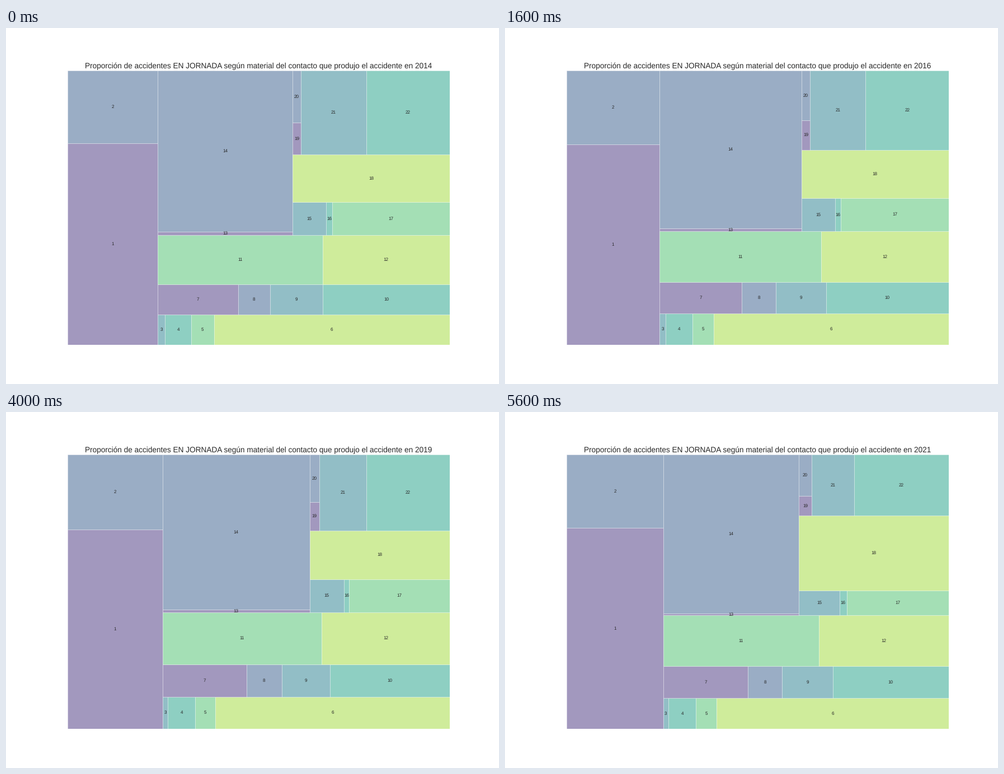
A matplotlib script that plays this animation: 881 px wide and 636 px high, repeating every 6400 ms.

```python
import matplotlib
import matplotlib.pyplot as plt
import numpy as np
from matplotlib.animation import FuncAnimation
from matplotlib.patches import Rectangle

W, H, DPI = 881, 636, 64
PT = 72 / DPI  # points per pixel
FIRST_YEAR, YEARS = 2014, 8
INK = "#262626"

plt.rcParams["font.family"] = "Liberation Sans"
plt.rcParams["text.hinting"] = "none"

# Accidents per 10,000 for each material, in three key years.
SHARES = {
    2014: [1734, 625, 21, 76, 65, 680, 232, 92, 153, 366, 775,
           598, 43, 2072, 106, 20, 370, 714, 26, 42, 524, 667],
    2019: [1804, 677, 17, 84, 62, 720, 257, 108, 148, 366, 799,
           641, 33, 2183, 107, 17, 317, 650, 25, 42, 342, 602],
    2021: [1852, 676, 15, 81, 60, 679, 260, 104, 155, 355, 754,
           630, 24, 2058, 96, 17, 241, 1070, 24, 49, 249, 551],
}


def shares_for(year):
    """Shares as areas of a 100 x 100 square, easing out between key years."""
    a, b = (2014, 2019) if year <= 2019 else (2019, 2021)
    pace = ((year - a) / (b - a)) ** 0.6
    mix = (1 - pace) * np.array(SHARES[a]) + pace * np.array(SHARES[b])
    return list(mix * 1e4 / mix.sum())


def worst_ratio(strip, side):
    depth = sum(strip) / side
    return max(max(s / depth**2, depth**2 / s) for s in strip)


def squarify(sizes):
    """Squarified treemap: boxes (x, y, width, height) in the given order."""
    x, y, dx, dy = 0, 0, 100, 100
    boxes = []
    while sizes:
        side = min(dx, dy)
        n = 1
        while (n < len(sizes) and worst_ratio(sizes[:n], side)
               >= worst_ratio(sizes[:n + 1], side)):
            n += 1
        strip, sizes = sizes[:n], sizes[n:]
        depth = sum(strip) / side
        offset = 0
        for size in strip:
            length = size / depth
            if dx >= dy:
                boxes.append((x, y + offset, depth, length))
            else:
                boxes.append((x + offset, y, length, depth))
            offset += length
        if dx >= dy:
            x, dx = x + depth, dx - depth
        else:
            y, dy = y + depth, dy - depth
    return boxes


fig = plt.figure(figsize=(W / DPI, H / DPI), dpi=DPI, facecolor="white")
ax = fig.add_axes([0.125, 0.11, 0.775, 0.77])
ax.set_xlim(0, 100)
ax.set_ylim(0, 100)
ax.axis("off")
title = ax.set_title("", fontsize=13.59 * PT, color=INK, pad=4.08 * PT)

palette = matplotlib.colormaps["viridis"](np.linspace(0, 1, 8)[1:-1])
cells, labels = [], []
for i in range(len(SHARES[FIRST_YEAR])):
    cell = Rectangle((0, 0), 1, 1, facecolor=palette[i % len(palette)],
                     edgecolor="white", linewidth=0.68 * PT, alpha=0.5)
    cells.append(ax.add_patch(cell))
    labels.append(ax.text(0, 0, str(i + 1), fontsize=8.16 * PT, color=INK,
                          ha="center", va="center"))


def draw(frame):
    year = FIRST_YEAR + frame
    title.set_text("Proporción de accidentes EN JORNADA según material del "
                   f"contacto que produjo el accidente en {year}")
    for cell, label, box in zip(cells, labels, squarify(shares_for(year))):
        x, y, w, h = box
        cell.set_bounds(*box)
        label.set_position((x + w / 2, y + h / 2))
    return [title, *cells, *labels]


anim = FuncAnimation(fig, draw, frames=YEARS, interval=800, repeat=True)
plt.show()
```
